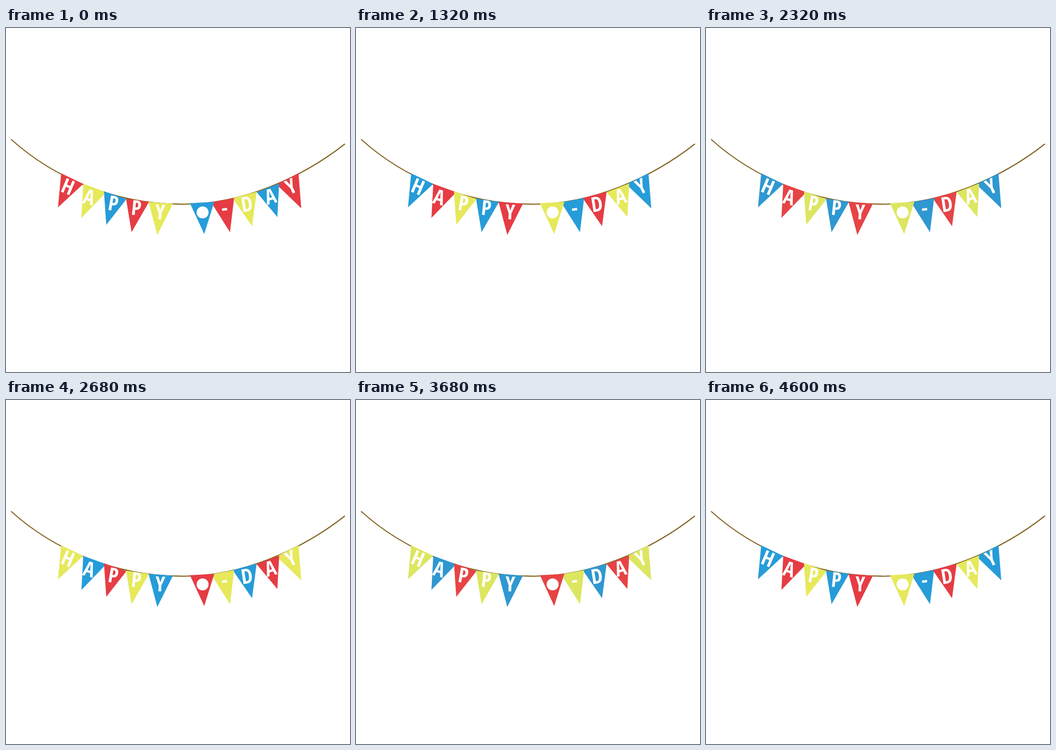
An HTML page with a canvas that plays this animation: 748x748 px, repeating every 4.72 s.

```html
<!DOCTYPE html>
<html lang="en">
<head>
<meta charset="utf-8">
<title>Birthday bunting</title>
<style>
  html, body { margin: 0; width: 100%; height: 100%; overflow: hidden; background: #fff; }
  canvas { display: block; }
</style>
</head>
<body>
<canvas id="stage" width="748" height="748"></canvas>
<script>
const ctx = document.getElementById('stage').getContext('2d');

const LOOP = 4720, TICK = 40;
const FADE_START = 140, FADE_TIME = 88, FADE_PERIOD = 272;
const COLORS = [[230, 60, 68], [230, 233, 90], [38, 156, 216]];
const CAP_SIZE = 45, MAX_ADVANCE = 28;

// corners: left, right, tip; mark: text, centre x, centre y, tilt in degrees
const flags = [
  { corners: [120, 316, 168, 339, 113, 390], mark: ['H', 134.5, 345, 23] },
  { corners: [168, 339, 218, 357, 164, 413], mark: ['A', 181.5, 368, 15] },
  { corners: [213, 355, 262, 372, 218, 428], mark: ['P', 234, 381.5, 10] },
  { corners: [261, 371, 311, 378, 273, 444], mark: ['P', 284, 391, 6] },
  { corners: [310, 378, 363, 382, 329, 450], mark: ['Y', 335.5, 400, 3] },
  { corners: [400, 381, 453, 378, 431, 448], mark: null },
  { corners: [446, 379, 496, 370, 487, 444], mark: ['-', 475, 393.5, -7] },
  { corners: [493, 370, 545, 356, 535, 431], mark: ['D', 524, 383, -9] },
  { corners: [545, 357, 594, 338, 590, 411], mark: ['A', 575.5, 366, -15] },
  { corners: [588, 340, 636, 316, 642, 392], mark: ['Y', 620, 344, -25] },
];
// Each half overlaps towards the middle.
const paintOrder = [0, 1, 2, 3, 4, 9, 8, 7, 6, 5];

function letterFont(size) {
  return `bold extra-condensed ${size}px "Open Sans Condensed", "Roboto Condensed", "Noto Sans", sans-serif`;
}

// Use a smaller size when only a wide face is available.
function chooseFont() {
  ctx.font = letterFont(CAP_SIZE);
  const advance = ctx.measureText('H').width;
  return letterFont(CAP_SIZE * Math.min(1, MAX_ADVANCE / advance));
}
const font = chooseFont();

function drawRope() {
  ctx.beginPath();
  ctx.moveTo(11, 242);
  ctx.bezierCurveTo(103, 325, 236, 383, 380, 383);
  ctx.bezierCurveTo(516, 385, 648, 322, 737, 252);
  ctx.strokeStyle = '#80621f';
  ctx.lineWidth = 2.3;
  ctx.stroke();
}

function drawLetter([text, x, y, tilt]) {
  ctx.save();
  ctx.translate(x, y);
  ctx.rotate(tilt * Math.PI / 180);
  const box = ctx.measureText(text);
  ctx.fillText(text,
    (box.actualBoundingBoxLeft - box.actualBoundingBoxRight) / 2,
    (box.actualBoundingBoxAscent - box.actualBoundingBoxDescent) / 2);
  ctx.restore();
}

function drawDisc() {
  ctx.beginPath();
  ctx.arc(427.5, 401, 13, 0, Math.PI * 2);
  ctx.fill();
}

function mix(a, b, amount) {
  return `rgb(${a.map((v, i) => Math.round(v + (b[i] - v) * amount))})`;
}

function drawFlag({ corners, mark }, color) {
  const [lx, ly, rx, ry, tx, ty] = corners;
  ctx.beginPath();
  ctx.moveTo(lx, ly);
  ctx.lineTo(rx, ry);
  ctx.lineTo(tx, ty);
  ctx.closePath();
  ctx.fillStyle = color;
  ctx.fill();
  ctx.fillStyle = '#fff';
  if (mark) drawLetter(mark);
  else drawDisc();
}

function draw(now) {
  const time = Math.floor((now % LOOP) / TICK) * TICK;
  const sinceFade = time - FADE_START + FADE_PERIOD;
  const step = Math.floor(sinceFade / FADE_PERIOD);
  const amount = step > 0 ? Math.min(1, (sinceFade % FADE_PERIOD) / FADE_TIME) : 1;

  ctx.fillStyle = '#fff';
  ctx.fillRect(0, 0, 748, 748);
  ctx.font = font;
  drawRope();
  for (const i of paintOrder) {
    const from = COLORS[(i + step + 2) % 3];
    const to = COLORS[(i + step) % 3];
    drawFlag(flags[i], mix(from, to, amount));
  }
}

const start = performance.now();
function animate() {
  draw(performance.now() - start);
  requestAnimationFrame(animate);
}
animate();
</script>
</body>
</html>
```
